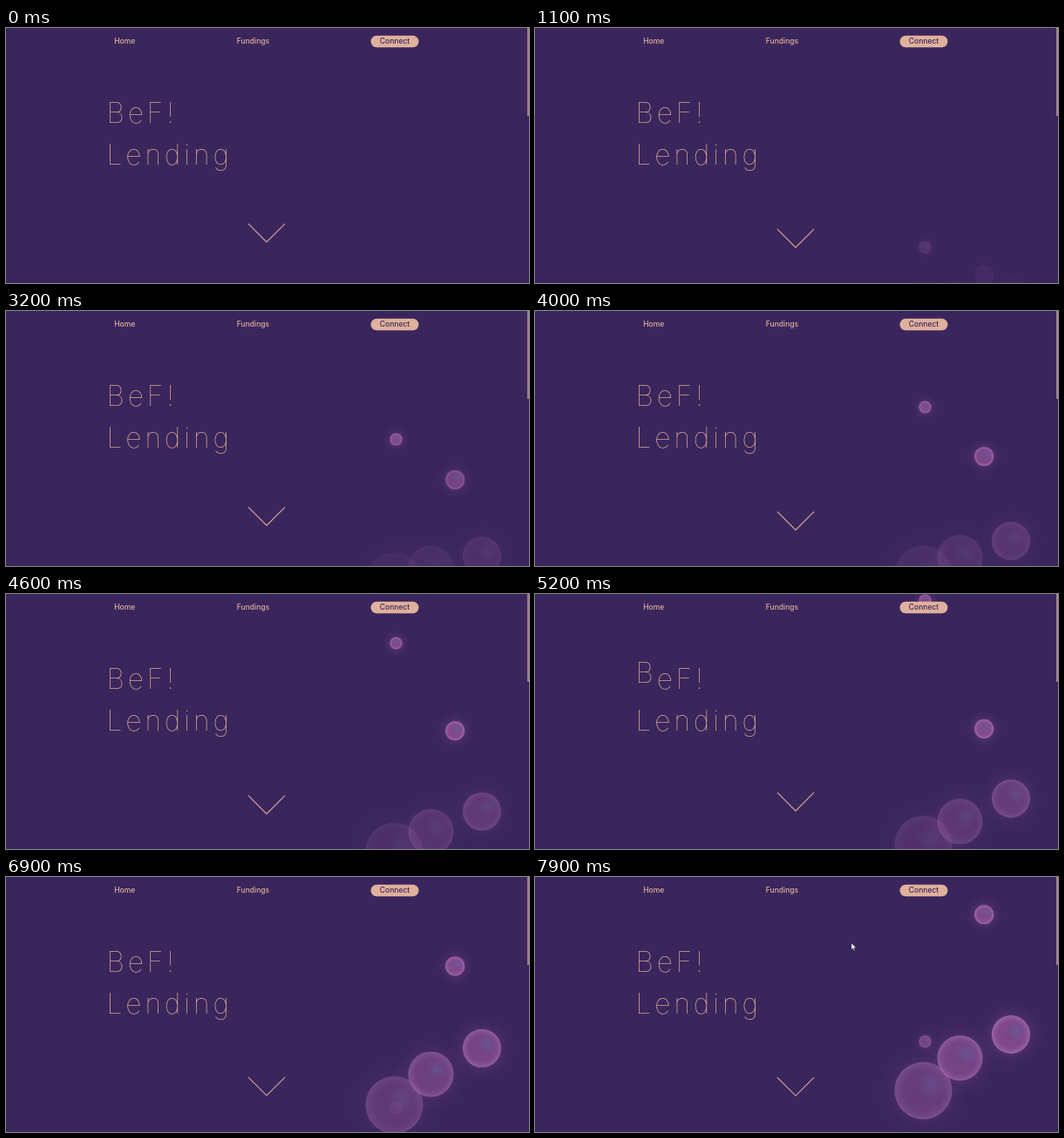
Write an HTML page with a canvas that moves like this. It is 600 by 293 pixels and loops after 8000 ms.

```html
<!DOCTYPE html>
<html lang="en">
<head>
<meta charset="utf-8">
<title>BeF! Lending</title>
<style>
  html, body { margin: 0; width: 100%; height: 100%; overflow: hidden; background: #3a265c; }
  canvas, svg { position: absolute; left: 0; top: 0; width: 600px; height: 293px; }
  text { font-family: Inter, "Open Sans", sans-serif; fill: #dfb09b; }
  .nav { font-size: 8.5px; font-weight: 500; text-anchor: middle; }
  .title { font-size: 31.8px; font-weight: 100; letter-spacing: 3.9px; }
</style>
</head>
<body>
<canvas id="stage"></canvas>
<svg viewBox="0 0 600 293">
  <rect x="598" y="0" width="2" height="101" fill="#a3808f"/>
  <rect x="418.5" y="8.8" width="55" height="13.4" rx="6.7" fill="#dfb19c"/>
  <text class="nav" x="136.2" y="18">Home</text>
  <text class="nav" x="283.5" y="18">Fundings</text>
  <text class="nav" x="446" y="18.4" style="fill:#3a265c">Connect</text>
  <text class="title" id="word" x="115.5" y="109.3">BeF!</text>
  <text class="title" x="115.5" y="157">Lending</text>
  <path id="chevron" d="M278 0 L299 21 L320 0" fill="none" stroke="#d9ab9a" stroke-width="1.1"/>
  <path id="pointer" d="M363 76 v7.4 l1.7 -1.6 1.2 2.6 1.2 -.5 -1.2 -2.6 h2.4 z"
        fill="#fff" stroke="#222" stroke-width=".4"/>
</svg>
<script>
const LOOP = 8000, STEP = 100, W = 600, H = 293;
const canvas = document.getElementById('stage');
const ctx = canvas.getContext('2d');
const word = document.getElementById('word');
const chevron = document.getElementById('chevron');
const pointer = document.getElementById('pointer');

const scale = window.devicePixelRatio || 1;
canvas.width = W * scale;
canvas.height = H * scale;
ctx.scale(scale, scale);

// Each bubble rises from below the stage, eases at mid height, then leaves at the top.
const bubbles = [
  { x: 445.5, r: 33, from: 324, mid: 180, to: -40, half: 15000 },
  { x: 487.5, r: 26, from: 317, mid: 173, to: -33, half: 12000 },
  { x: 546, r: 22, from: 312, mid: 168, to: -29, half: 10000 },
  { x: 515.2, r: 11, from: 298, mid: 155.5, to: -21, half: 5000 },
  { x: 447.5, r: 7, from: 292, mid: 149, to: -17, half: 3000 }
];

// Start times of the letter hops
const hops = [5000, 5550, 6100], HOP_TIME = 800, HOP_HEIGHT = 14;

const mix = (a, b, k) => a + (b - a) * k;

// cubic-bezier(.42, 0, .58, 1)
function easeInOut(u) {
  let lo = 0, hi = 1, s = u;
  for (let i = 0; i < 18; i++) {
    s = (lo + hi) / 2;
    const x = 3 * (1 - s) * s * (.42 * (1 - s) + .58 * s) + s * s * s;
    if (x < u) lo = s; else hi = s;
  }
  return s * s * (3 - 2 * s);
}

function radial(x, y, r0, r1, stops) {
  const g = ctx.createRadialGradient(x, y, r0, x, y, r1);
  stops.forEach(([at, color]) => g.addColorStop(at, color));
  return g;
}

function disc(x, y, r, fill) {
  ctx.beginPath();
  ctx.arc(x, y, r, 0, Math.PI * 2);
  ctx.fillStyle = fill;
  ctx.fill();
}

function drawBubble(b, t) {
  const local = t % (b.half * 2);
  const rising = local < b.half;
  const k = easeInOut((local % b.half) / b.half);
  const y = rising ? mix(b.from, b.mid, k) : mix(b.mid, b.to, k);
  const { x, r } = b, glow = r + 5 + r * .5;

  ctx.globalAlpha = rising ? k : 1;
  disc(x, y, glow, radial(x, y, r * .9, glow, [
    [0, 'rgba(160,80,165,.24)'], [.45, 'rgba(160,80,165,.08)'], [1, 'rgba(160,80,165,0)']
  ]));
  disc(x, y, r, radial(x, y, 0, r, [
    [0, '#7d4889'], [.7, '#854b90'], [.92, '#965fa2'], [1, '#a471ad']
  ]));
  disc(x, y, r * .94, radial(x + r * .26, y - r * .2, 0, r * .55, [
    [0, 'rgba(92,100,150,.8)'], [.4, 'rgba(98,92,148,.5)'], [1, 'rgba(110,80,145,0)']
  ]));
  ctx.globalAlpha = 1;
}

function hopLetters(t) {
  const lift = hops.map(start => {
    const u = (t - start) / HOP_TIME;
    return u > 0 && u < 1 ? -HOP_HEIGHT * Math.sin(Math.PI * u) ** 2 : 0;
  });
  lift.push(0);
  const shifts = lift.map((v, i) => (v - (lift[i - 1] || 0)).toFixed(2));
  word.setAttribute('dy', shifts.join(' '));
}

function draw(t) {
  ctx.fillStyle = '#3a265c';
  ctx.fillRect(0, 0, W, H);
  bubbles.forEach(b => drawBubble(b, t));
  hopLetters(t);
  const dip = (1 - Math.cos((t + 80) / 3000 * Math.PI * 2)) / 2;
  chevron.setAttribute('transform', `translate(0 ${(224.9 + 7 * dip).toFixed(2)})`);
  pointer.style.display = t >= 7500 ? '' : 'none';
}

const begin = performance.now();
function frame() {
  const t = (performance.now() - begin) % LOOP;
  draw(Math.floor(t / STEP) * STEP);
  requestAnimationFrame(frame);
}
frame();
</script>
</body>
</html>
```
